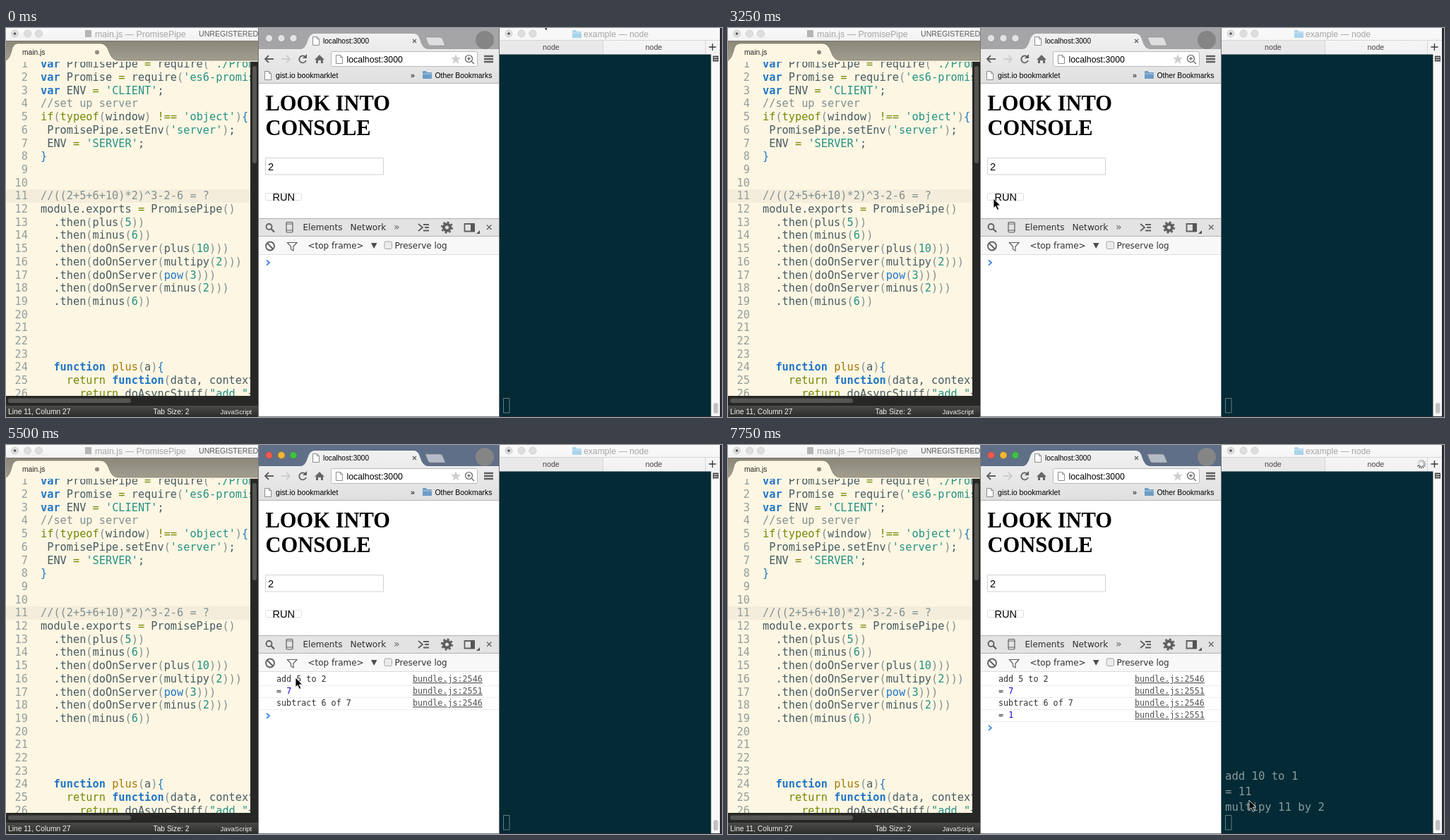
An HTML page for the animation above (8 s loop, 1014 by 552 pixels).

```html
<!DOCTYPE html>
<html lang="en">
<head>
<meta charset="utf-8">
<title>Pipe demo</title>
<style>
html, body { margin: 0; width: 100%; height: 100%; overflow: hidden; background: #2b2a35; }
svg { display: block; width: 1014px; height: 552px; font-family: "Liberation Sans", Arial, sans-serif; }
text { white-space: pre; }
.mono { font-family: "DejaVu Sans Mono", monospace; }
.code { font-size: 15.27px; fill: #475b62; }
.nums { font-size: 15.27px; fill: #939f9c; text-anchor: end; }
.log { font-size: 11.72px; fill: #303030; }
.link { fill: #545454; text-decoration: underline; }
.term { font-size: 15.6px; fill: #8a9a9b; }
.ui { font: 12px "DejaVu Sans", sans-serif; fill: #303030; }
.line { fill: none; stroke: #5f5f5f; stroke-width: 1.8; }
.thin { stroke-width: 1.2; }
.thick { stroke-width: 2.3; }
.comment, .paren { fill: #819090; }
.key { fill: #2176c7; font-weight: bold; }
.word { fill: #738a05; }
.blue { fill: #2176c7; }
.str { fill: #259286; }
.name { fill: #a57706; }
</style>
</head>
<body>
<svg viewBox="0 0 1014 552">
  <defs>
    <linearGradient id="title" x2="0" y2="1"><stop stop-color="#fafafa"/><stop offset="1" stop-color="#f1f1f1"/></linearGradient>
    <linearGradient id="tabs" x2="0" y2="1"><stop stop-color="#8b8778"/><stop offset="1" stop-color="#a39f90"/></linearGradient>
    <linearGradient id="status" x2="0" y2="1"><stop stop-color="#4a4a48"/><stop offset="1" stop-color="#2c2c2b"/></linearGradient>
    <linearGradient id="bar" x2="0" y2="1"><stop stop-color="#f1f1f1"/><stop offset="1" stop-color="#e0e0e0"/></linearGradient>
    <clipPath id="pane"><path d="M0 48H346V522H0Z"/></clipPath>
    <g id="page"><path d="M.5 .5H6.5L9.5 3.5V12.5H.5Z" fill="#fff" stroke="#8d8d8d"/><path d="M6.5 .5V3.5H9.5" fill="none" stroke="#8d8d8d"/></g>
    <g id="folder"><path d="M0 2Q0 0 1 0H5L6 2H13V11H0Z"/><path d="M0 4H13" stroke="#fff" stroke-opacity=".5"/></g>
    <g id="idle" fill="#dedede" stroke="#cfcfcf"><circle r="5"/><circle cx="18" r="5"/><circle cx="34" r="5"/><circle r="1.8" fill="#555" stroke="none"/></g>
  </defs>

  <!-- editor -->
  <path d="M0 0H357V18H0Z" fill="url(#title)"/>
  <use href="#idle" x="12.5" y="8"/>
  <path d="M112 3H121V13H112Z" fill="#b5b5b5"/>
  <text x="126" y="12.5" font-size="12.4" fill="#a5a5a5">main.js — PromisePipe</text>
  <text x="273" y="12" font-size="10.6" fill="#5a5a5a">UNREGISTERED</text>
  <path d="M0 18H357V48H0Z" fill="url(#tabs)"/>
  <path d="M0 18.5H357" stroke="#77746a"/>
  <path d="M0 46Q5 44 8 32Q10 22 17 22H134Q142 22 146 34Q150 46 159 46H357V48H0Z" fill="#fdf6e3" stroke="#6d695c" stroke-width=".6"/>
  <text x="23" y="38" font-size="10.2" fill="#222">main.js</text>
  <circle cx="129" cy="34.5" r="3" fill="#908c80"/>
  <path d="M0 47H346V522H0Z" fill="#fdf6e3"/>
  <path d="M0 229H346V248H0Z" fill="#f4eddb"/>
  <g clip-path="url(#pane)"><g id="nums" class="mono nums"></g><g id="code" class="mono code"></g></g>
  <path d="M346 48H357V536H0V522H346Z" fill="#272725"/>
  <rect x="349" y="54" width="6" height="138" rx="3" fill="#555552"/>
  <rect x="3" y="525.5" width="174" height="6.5" rx="3.2" fill="#555552"/>
  <path d="M0 536H357V552H0Z" fill="url(#status)"/>
  <g font-size="10.3" fill="#f0f0f0"><text x="3" y="548">Line 11, Column 27</text><text x="208.5" y="548">Tab Size: 2</text><text x="303.5" y="548" font-size="9.6">JavaScript</text></g>

  <!-- browser -->
  <path d="M357 0H699V552H357Z" fill="#77777a"/>
  <path d="M358 0H698V551H358Z" fill="#fff"/>
  <path id="strip" d="M358 0H698V31H358Z"/>
  <g id="lights" stroke="#000" stroke-opacity=".15"><circle cx="372.5" cy="14.5" r="5"/><circle cx="390" cy="14.5" r="5"/><circle cx="407" cy="14.5" r="5"/></g>
  <path id="plus" d="M594 13H614Q617 13 618 15L622 25H602Q599 25 598 23Z" stroke="#888" stroke-width=".6"/>
  <circle cx="678" cy="17" r="13" fill="#858585"/>
  <path d="M358 30H418Q424 29 427 19Q430 8 437 8H578Q584 8 587 19Q590 29 597 30H698V78H358Z" fill="url(#bar)"/>
  <path d="M358 78.5H698" stroke="#b5b5b5"/>
  <use href="#page" x="434" y="12"/>
  <text x="449" y="22" font-size="10.1">localhost:3000</text>
  <path class="line thin" d="M576 16L581 21M581 16L576 21"/>
  <path class="line" d="M379 44H367M372 39L367 44L372 49"/>
  <path class="line" d="M390 44H402M397 39L402 44L397 49" style="stroke:#cdcdcd"/>
  <path class="line" d="M424 41A5 5 0 1 0 425 46"/><path d="M426 37V43H420Z" fill="#5f5f5f"/>
  <path d="M444 38L451 45H449V50H446V46H442V50H439V45H437Z" fill="#686868"/>
  <rect x="460.5" y="33.5" width="207" height="21" rx="2" fill="#fff" stroke="#b9b9b9"/>
  <use href="#page" x="467" y="38"/>
  <text x="482.5" y="49" font-size="12.3">localhost:3000</text>
  <path d="M637 37L639 42H644L640 45.5L641.5 51L637 47.5L632.5 51L634 45.5L630 42H635Z" fill="#cfcfcf"/>
  <path class="line thin" d="M659.5 47.5L663 51M653 43.5H658M655.5 41V46"/><circle class="line thin" cx="655.5" cy="43.5" r="5"/>
  <path class="line thick" d="M677 40H690M677 44H690M677 48H690"/>
  <use href="#page" x="366" y="61"/>
  <g font-size="10.6"><text x="382" y="71">gist.io bookmarklet</text><text x="573" y="71">»</text><text x="607.5" y="71" font-size="10.4">Other Bookmarks</text></g>
  <use href="#folder" x="590" y="61" fill="#6c9cc6"/>
  <g font-family="Liberation Serif, Times, serif" font-weight="bold" font-size="30.5"><text x="367.5" y="116.5">LOOK INTO</text><text x="367.5" y="151.5">CONSOLE</text></g>
  <path d="M367.5 184.5H534.5V208H367.5Z" fill="#fff" stroke="#d2d2d2"/>
  <text x="371" y="202" font-size="14.6">2</text>
  <rect x="367.5" y="234.5" width="51" height="10" rx="2" fill="#fff" stroke="#dedede"/>
  <text x="377.5" y="245" font-size="14.6">RUN</text>

  <!-- developer tools -->
  <path d="M358 270H698V296H358Z" fill="#e3e3e3"/>
  <path d="M358 296H698V321H358Z" fill="#f8f8f8"/>
  <path d="M358 270.5H698M358 295.5H698" stroke="#b0b0b0"/>
  <path d="M358 321.5H698" stroke="#dcdcdc"/>
  <circle class="line" cx="372.5" cy="282" r="4"/><path class="line thick" d="M375.5 285L380 289.5"/>
  <rect class="line thin" x="397" y="275.5" width="9" height="14.5" rx="1.5"/><path class="line thin" d="M397 278H406M397 287H406"/>
  <g class="ui"><text x="420.5" y="287">Elements</text><text x="487.5" y="287" font-size="12.2">Network</text><text x="549" y="287" font-size="14" fill="#666">»</text><text x="427.5" y="313">&lt;top frame&gt;</text><text x="550.5" y="313">Preserve log</text></g>
  <path class="line" d="M584 278L590 283L584 288M591 279H599M593 283H599M591 287.5H599"/>
  <circle cx="624.5" cy="283" r="4.5" fill="none" stroke="#5f5f5f" stroke-width="4"/><circle cx="624.5" cy="283" r="7.3" fill="none" stroke="#5f5f5f" stroke-width="2.6" stroke-dasharray="2.87"/>
  <path class="line" d="M649.5 278H663V288.5H649.5Z"/><path d="M658 277H664V289H658ZM671 287V292H666Z" fill="#555"/>
  <path class="line thin" d="M681 279.5L687.5 286M687.5 279.5L681 286"/>
  <circle class="line" cx="374" cy="309.5" r="6"/><path class="line" d="M370 305.5L378 313.5"/>
  <path class="line thin" d="M398.5 304.5H412L407 310V316L403.5 314V310Z"/>
  <path d="M517 305H525.5L521.2 313Z" fill="#4d4d4d"/>
  <rect x="536" y="303" width="10.5" height="10.5" rx="2" fill="#ececec" stroke="#a5a5a5"/>
  <g id="rows" class="mono log"></g>
  <path id="prompt" d="M369 -3.5L373 0L369 3.5" fill="none" stroke="#3d86e8" stroke-width="1.8"/>

  <!-- terminal -->
  <path d="M699 0H1011V38H699Z" fill="url(#title)"/>
  <use href="#idle" x="712" y="8"/>
  <use href="#folder" x="802" y="3" fill="#a9d3ea"/>
  <text x="818" y="12.5" font-size="12.2" fill="#a5a5a5">example — node</text>
  <path d="M699 17H845V38H699Z" fill="#e9e9e9"/>
  <path d="M699 17.5H1011M845.5 17V38M990.5 17V38" stroke="#d6d6d6"/>
  <g font-size="10.7" fill="#444"><text x="760" y="31">node</text><text x="905.5" y="31">node</text></g>
  <path d="M995.5 27H1005.5M1000.5 22V32" stroke="#333" stroke-width="1.3"/>
  <path d="M699 37.5H998.5V551H699Z" fill="#032a35"/>
  <path d="M998.5 37.5H1011V551H998.5Z" fill="#f8f8f8"/>
  <path d="M1001 39.5H1009V47.5H1001Z" fill="#444"/><path d="M1002 42H1008M1002 45H1008" stroke="#fff"/>
  <rect x="1002" y="532" width="6.5" height="15" rx="3.2" fill="#c1c1c1"/>
  <g id="term" class="mono term"></g>
  <path d="M704.5 525.5H713V546H704.5Z" fill="none" stroke="#667c80"/>
  <g id="spin"></g>
  <path id="cursor" d="M0 0V13.5L3 10.8L5.4 16.3L7.7 15.3L5.3 9.9H9.6Z" fill="#000" stroke="#fff" stroke-width=".8"/>
</svg>
<script>
const $ = id => document.getElementById(id);
const esc = s => s.replace(/&/g, '&amp;').replace(/</g, '&lt;');
const span = (cls, s) => `<tspan class="${cls}">${esc(s)}</tspan>`;

const source = `var PromisePipe = require('./PromisePipe');
var Promise = require('es6-promise');
var ENV = 'CLIENT';
//set up server
if(typeof(window) !== 'object'){
 PromisePipe.setEnv('server');
 ENV = 'SERVER';
}


//((2+5+6+10)*2)^3-2-6 = ?
module.exports = PromisePipe()
  .then(plus(5))
  .then(minus(6))
  .then(doOnServer(plus(10)))
  .then(doOnServer(multipy(2)))
  .then(doOnServer(pow(3)))
  .then(doOnServer(minus(2)))
  .then(minus(6))




  function plus(a){
    return function(data, context){
      return doAsyncStuff("add "+a`.split('\n');

const rules = [
  ['comment', /^\/\/.*/], ['str', /^('[^']*'|"[^"]*"|\b\d+)/], ['key', /^(var|function)\b/],
  ['word', /^(if|typeof|return|!==|=)(?!\w)/], ['blue', /^(pow|[{}])/],
  ['name', /^plus(?=\(a)/], ['paren', /^[()]/], ['', /^(\w+|.)/]
];

function paint(line) {
  let out = '';
  while (line) {
    const [cls, re] = rules.find(r => r[1].test(line));
    const token = line.match(re)[0];
    out += cls ? span(cls, token) : esc(token);
    line = line.slice(token.length);
  }
  return out;
}

const lineY = i => 56.3 + i * 18.7;
$('code').innerHTML = source.map((s, i) => `<text x="49" y="${lineY(i)}">${paint(s)}</text>`).join('');
$('nums').innerHTML = source.map((s, i) => `<text x="31" y="${lineY(i)}">${i + 1}</text>`).join('');

// [time shown, text, line in bundle]
const logs = [[4500, 'add 5 to 2', 2546], [5500, '= 7', 2551], [5500, 'subtract 6 of 7', 2546], [6500, '= 1', 2551]];
const output = [[6500, 'add 10 to 1'], [7500, '= 11'], [7500, 'multipy 11 by 2']];

$('rows').innerHTML = logs.map(([, s, n], i) => {
  const y = 336 + i * 17.1;
  const body = s[0] === '=' ? `= <tspan fill="#1c00cf">${s.slice(2)}</tspan>` : s;
  return `<g><text x="383" y="${y}">${body}</text><text class="link" x="576" y="${y}">bundle.js:${n}</text>` +
    `<path d="M358 ${Math.round(y + 5) + .5}H698" stroke="#eeeeee"/></g>`;
}).join('');
$('term').innerHTML = output.map(([, s]) => `<text x="704">${s}</text>`).join('');
$('spin').innerHTML = Array.from({ length: 12 }, (_, i) =>
  `<path d="M0 -3V-6.5" transform="rotate(${i * 30})" stroke="#222" stroke-width="1.2" opacity="${.15 + i * .07}"/>`).join('');

// pointer stops: time, x, y
const stops = [
  [0, 759, -13], [250, 567, 121], [500, 488, 147], [750, 413, 191], [1000, 297, 231], [1250, 256, 237],
  [1500, 271, 216], [1750, 300, 236], [2000, 274, 254], [2250, 267, 251], [2500, 266, 246], [2750, 318, 218],
  [3000, 373, 237], [3250, 376, 242], [5500, 410, 330], [5750, 409, 350], [6250, 438, 375],
  [6500, 444, 377], [6750, 447, 415], [7000, 477, 408], [7250, 690, 497], [7500, 738, 504]
];

const show = (el, on) => el.style.display = on ? '' : 'none';

function draw(now) {
  const t = Math.floor(now % 8000 / 250) * 250;
  const past = item => item[0] <= t;

  const active = t >= 3750;
  $('strip').setAttribute('fill', active ? '#5f6f87' : '#a5a5a8');
  $('plus').setAttribute('fill', active ? '#b4bcc8' : '#dedede');
  const colors = active ? ['#f0594e', '#f4b62f', '#3fc146'] : ['#e2e2e2', '#e2e2e2', '#e2e2e2'];
  [...$('lights').children].forEach((c, i) => c.setAttribute('fill', colors[i]));

  [...$('rows').children].forEach((g, i) => show(g, past(logs[i])));
  $('prompt').setAttribute('transform', `translate(0 ${333 + 17.1 * logs.filter(past).length})`);

  const count = output.filter(past).length;
  [...$('term').children].forEach((line, i) => {
    show(line, i < count);
    line.setAttribute('y', 519 - (count - 1 - i) * 22);
  });

  show($('spin'), t >= 7000);
  $('spin').setAttribute('transform', `translate(982 27) rotate(${(t - 7000) / 250 * 90})`);

  const [, x, y] = stops.filter(past).pop();
  $('cursor').setAttribute('transform', `translate(${x} ${y})`);
  requestAnimationFrame(draw);
}
requestAnimationFrame(draw);
</script>
</body>
</html>
```
